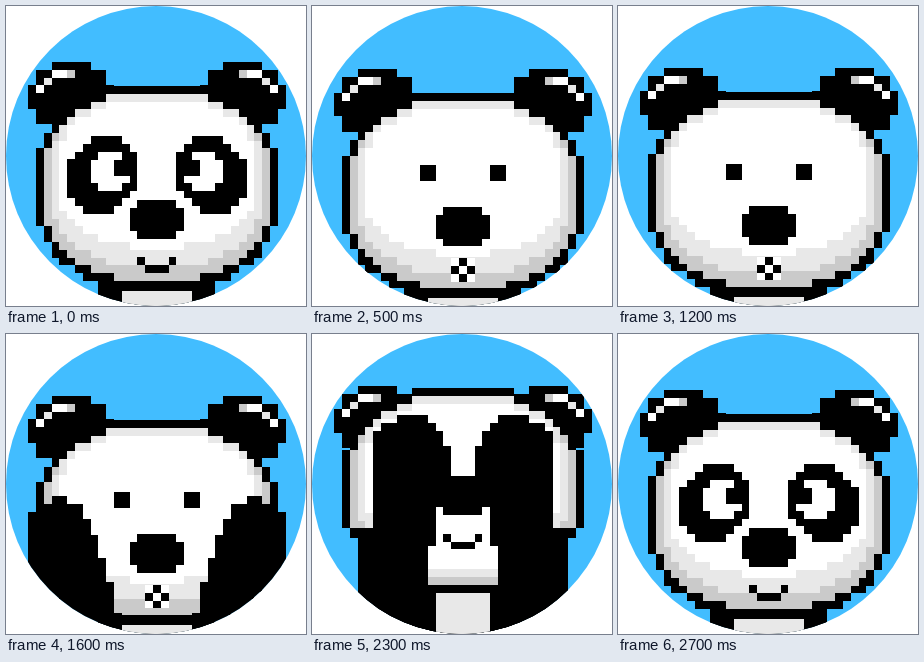
Animation of 300 by 300 pixels, one loop 2900 ms. Source, as an HTML page with a canvas:

```html
<!DOCTYPE html>
<html lang="en">
<head>
<meta charset="utf-8">
<title>Panda</title>
<style>
html, body { margin: 0; width: 100%; height: 100%; overflow: hidden; background: #fff; }
canvas { display: block; width: 300px; height: 300px; }
</style>
</head>
<body>
<canvas id="stage" width="300" height="300"></canvas>
<script>
const ctx = document.getElementById('stage').getContext('2d');
const CELL = 7.8, ORIGIN = 147, LOOP = 2900, STEP = 100;
const BLACK = '#000', WHITE = '#fff', PALE = '#e8e8e8', GRAY = '#cacaca', SKY = '#42bdff';

const colX = col => Math.round(ORIGIN + col * CELL);

// Fills cells between two column edges, and their mirror image around column 0.
function box(left, right, y, rows, color) {
  const top = Math.round(y), height = Math.round(y + rows * CELL) - top;
  ctx.fillStyle = color;
  for (const [a, b] of [[left, right], [1 - right, 1 - left]]) {
    ctx.fillRect(colX(a), top, colX(b) - colX(a), height);
  }
}

// A pixelated, mirrored superellipse: y is the top of the cell grid, the rest is in cells.
function oval(y, cx, cy, rx, ry, color, power = 2, skew = 0) {
  for (let row = Math.ceil(cy - ry - 0.5); row + 0.5 < cy + ry; row++) {
    const dy = row + 0.5 - cy;
    const half = rx * (1 - Math.abs(dy / ry) ** power) ** (1 / power);
    const mid = cx + skew * dy;
    box(Math.round(mid - half), Math.round(mid + half), y + row * CELL, 1, color);
  }
}

// A rounded limb that runs off the bottom of the stage.
function limb(y, cx, r, color) {
  oval(y, cx, r, r, r, color);
  box(Math.round(cx - r), Math.round(cx + r), y + Math.round(r) * CELL, 40, color);
}

function drawEars(y) {
  oval(y, -10.5, 4.5, 5.5, 4.5, BLACK);
  box(-13, -11, y + CELL, 1, WHITE);
  box(-11, -10, y + CELL, 1, GRAY);
  box(-14, -13, y + 2 * CELL, 1, PALE);
  box(-15, -14, y + 3 * CELL, 1, WHITE);
}

function drawHead(y) {
  oval(y, 0.5, 13, 15.6, 13, BLACK, 2.5);
  oval(y, 0.5, 13, 14.6, 12, GRAY, 2.5);
  oval(y, 0.5, 12, 13.7, 11.2, PALE, 2.5);
  oval(y, 0.5, 11.2, 12.8, 9.5, WHITE, 2.5);
}

function drawBody(y) {
  box(-7, 8, y + 25 * CELL, 4, BLACK);
  box(-4, 5, y + 205, 3, PALE);
}

function drawPatches(y) {
  oval(y + 50, -6.6, 5, 4.6, 5, BLACK, 2, -0.15);
  oval(y + 66, -5.5, 2.5, 2.6, 2.5, WHITE);
  box(-5, -3, y + 74, 2, BLACK);
}

function drawEyes(y, shut) {
  box(-5, -3, y + (shut ? 84 : 72), shut ? 0.5 : 2, BLACK);
}

function drawSmile(y) {
  box(-2, -1, y, 1, BLACK);
  box(-1, 2, y + CELL, 1, BLACK);
}

function drawOpenMouth(y) {
  box(-1, 2, y, 3, WHITE);
  box(0, 1, y, 3, BLACK);
  box(-1, 2, y + CELL, 1, BLACK);
  box(0, 1, y + CELL, 1, WHITE);
}

function drawPaws(y) {
  limb(y, -7, 4, BLACK);
  limb(y + 5 * CELL, -6, 2, PALE);
}

function drawRisingArms(y) {
  for (let row = 0; row < 24; row++) {
    const left = Math.max(-16, Math.round(-13 - 1.3 * row));
    const right = Math.round(-11 + 7 * Math.sqrt(row / 17));
    box(left, right, y + row * CELL, 1, BLACK);
  }
}

// Arms held over the eyes, with the muzzle showing between them.
function drawCover(y, tilt, noseY) {
  limb(y + 38 - tilt / 2, -6.3, 5, BLACK);
  box(-6, 7, noseY, 40, BLACK);
  box(-13, 14, y + 140, 40, BLACK);
  box(-3, -2, y + 119, 1, WHITE);
  box(-3, 4, y + 127, 4, WHITE);
  box(-4, 5, y + 158, 3, WHITE);
  box(-4, 5, y + 181, 1, PALE);
  box(-4, 5, y + 189, 1, GRAY);
  box(-4, 5, y + 197, 1, BLACK);
  box(-3, 4, y + 205, 20, PALE);
}

// Linear motion through [time, value] keys.
function track(keys, t) {
  const i = keys.findIndex(([time]) => time > t);
  if (i < 0) return keys[keys.length - 1][1];
  const [t0, v0] = keys[i - 1], [t1, v1] = keys[i];
  return v0 + (v1 - v0) * (t - t0) / (t1 - t0);
}

const HEAD_TOP = [[0, 80], [300, 90], [600, 86], [1600, 86], [1900, 76],
  [2200, 76], [2300, 54], [2600, 83], [2700, 80]];
const TILT = [[0, 0], [1600, 0], [1900, 7], [2200, 7], [2300, 22], [2500, 0]];

function draw(t) {
  const during = (from, to) => t >= from && t < to;
  const top = track(HEAD_TOP, t), tilt = track(TILT, t);
  const covered = during(1800, 2500);
  const patched = !during(200, 2400);
  const noseY = top + 114 - 1.2 * tilt;

  ctx.clearRect(0, 0, 300, 300);
  ctx.save();
  ctx.beginPath();
  ctx.arc(150, 150, 150, 0, 7);
  ctx.clip();
  ctx.fillStyle = SKY;
  ctx.fillRect(0, 0, 300, 300);

  ctx.save();
  if (covered) {
    ctx.beginPath();
    ctx.rect(0, 0, 300, top + 150);
    ctx.clip();
  }
  drawEars(top - 24 + tilt);
  drawBody(top);
  drawHead(top);
  ctx.restore();

  if (covered) drawCover(top, tilt, noseY);
  else if (patched) drawPatches(top);
  else drawEyes(top, during(700, 800) || during(1300, 1400));

  if (during(100, 600)) drawPaws(140 + 0.4 * (t - 100));
  if (during(1600, 1800)) drawRisingArms(162 - 0.3 * (t - 1600));
  oval(noseY, 0.5, 2.5, 3.6, 2.6, BLACK);
  if (during(200, 1800)) drawOpenMouth(top + 165);
  else drawSmile(top + 171 - 1.15 * tilt);
  ctx.restore();
}

function tick() {
  const t = performance.now() % LOOP;
  draw(t - t % STEP);
  requestAnimationFrame(tick);
}
tick();
</script>
</body>
</html>
```
